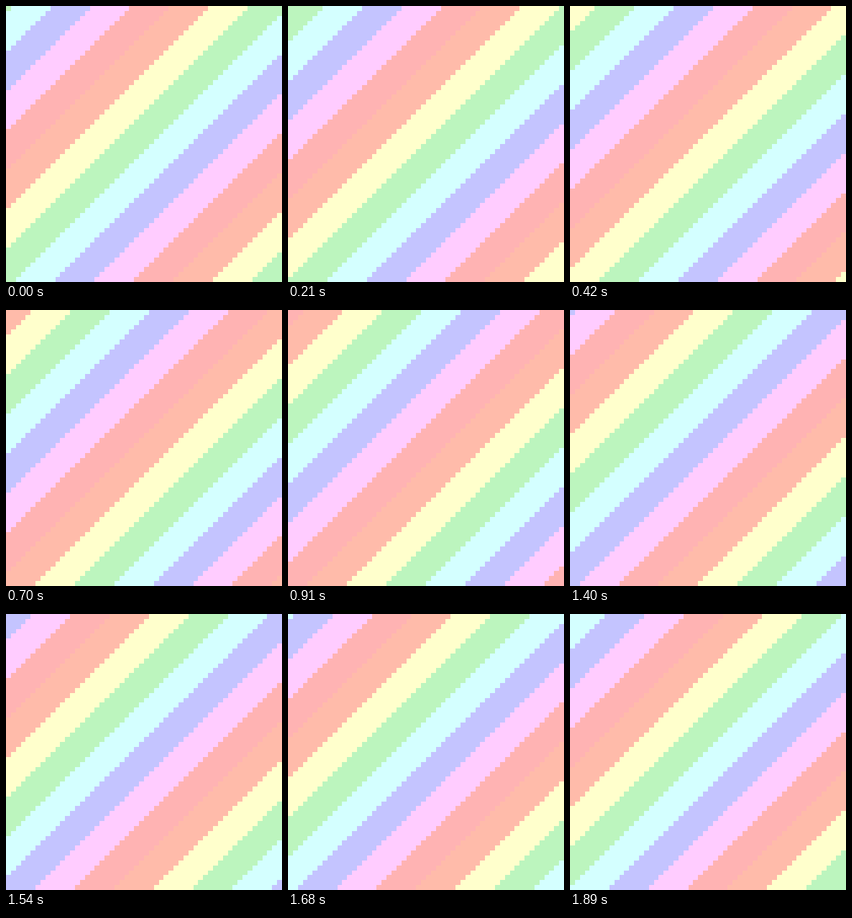
Animation, 384 px wide and 384 px high, one loop 1.96 s. Source, as an HTML page with a canvas:

```html
<!DOCTYPE html>
<html lang="en">
<head>
<meta charset="utf-8">
<title>Pastel stripes</title>
<style>
  html, body { margin: 0; width: 100%; height: 100%; overflow: hidden; }
  canvas { display: block; width: 100vw; height: 100vh; image-rendering: pixelated; }
</style>
</head>
<body>
<canvas width="56" height="56"></canvas>
<script>
  const SIZE = 56, BAND = 8, STEP_MS = 70, STEPS = 28, CELLS_PER_STEP = 2;
  // Stripe colours from the top-left corner towards the bottom right
  const colors = ['#d4ffff', '#c4c4ff', '#ffccff', '#ffb3b3', '#ffbbaa', '#ffffcc', '#bcf5be'];
  const ctx = document.querySelector('canvas').getContext('2d');

  function draw(now) {
    const step = Math.floor(now / STEP_MS) % STEPS;
    const shift = step * CELLS_PER_STEP + 1;
    for (let y = 0; y < SIZE; y++) {
      for (let x = 0; x < SIZE; x++) {
        const pos = (x + y - shift + 2 * SIZE) % SIZE;
        ctx.fillStyle = colors[Math.floor(pos / BAND)];
        ctx.fillRect(x, y, 1, 1);
      }
    }
  }

  const start = performance.now();
  function tick() {
    draw(performance.now() - start);
    requestAnimationFrame(tick);
  }
  tick();
</script>
</body>
</html>
```
